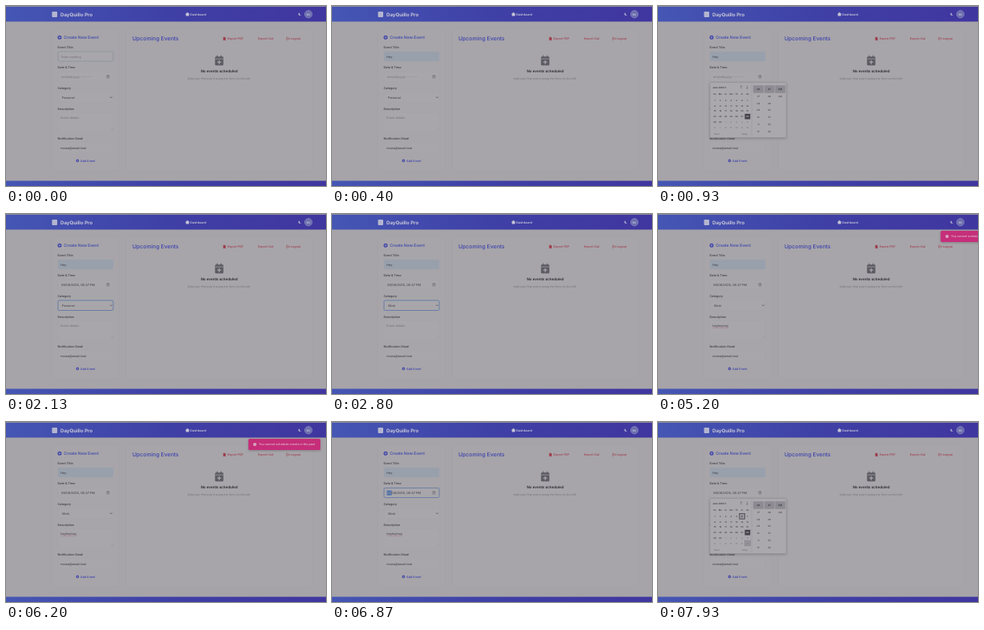
An HTML page that plays this animation: 400x225 px, repeating every 8 s.

```html
<!DOCTYPE html>
<html lang="en">
<head>
<meta charset="utf-8">
<style>
html, body { margin: 0; width: 100%; height: 100%; overflow: hidden; background: #a6a4a8; }
svg { display: block; width: 100vw; height: 100vh; }
text { font-family: Inter, "Liberation Sans", sans-serif; white-space: pre; text-rendering: geometricPrecision; }
</style>
</head>
<body>
<svg id="stage" viewBox="0 0 400 225">
  <defs>
    <linearGradient id="bar">
      <stop offset="0" stop-color="#4556b4"/>
      <stop offset=".5" stop-color="#3f40a6"/>
      <stop offset="1" stop-color="#40369f"/>
    </linearGradient>
    <filter id="shadow" x="-20%" y="-20%" width="140%" height="140%">
      <feDropShadow dx="0" dy="1" stdDeviation="1.5" flood-color="#333" flood-opacity=".3"/>
    </filter>
  </defs>
</svg>
<script>
const LOOP = 8000;
const INK = '#3a3940', MUTED = '#747278', BLUE = '#3d42ae', RED = '#a03a4e', PALE = '#c6c6d6', PAGE = '#a6a4a8';
const stage = document.getElementById('stage');

function add(parent, tag, attrs, content) {
  const node = document.createElementNS('http://www.w3.org/2000/svg', tag);
  for (const key in attrs) node.setAttribute(key, attrs[key]);
  if (content !== undefined) node.textContent = content;
  parent.appendChild(node);
  return node;
}
const group = (parent = stage) => add(parent, 'g', {});
const rect = (parent, x, y, width, height, fill, extra = {}) =>
  add(parent, 'rect', { x, y, width, height, fill, ...extra });
const path = (parent, d, stroke, width = .7, extra = {}) =>
  add(parent, 'path', { d, stroke, 'stroke-width': width, fill: 'none', ...extra });
const text = (parent, x, y, content, size = 3.8, fill = INK, weight = 400, anchor = 'start') =>
  add(parent, 'text', { x, y, 'font-size': size, fill, 'font-weight': weight, 'text-anchor': anchor }, content);
const show = (node, on) => node.setAttribute('visibility', on ? 'visible' : 'hidden');

function plusBadge(x, y, r) {
  add(stage, 'circle', { cx: x, cy: y, r, fill: BLUE });
  path(stage, `M${x - r * .55} ${y}h${r * 1.1}M${x} ${y - r * .55}v${r * 1.1}`, PAGE, r * .3);
}

function drawPage() {
  rect(stage, 0, 0, 400, 225, PAGE);
  rect(stage, 0, 0, 400, 19.5, 'url(#bar)');
  rect(stage, 0, 0, 400, 1, '#8d8b9b');
  rect(stage, 0, 218.5, 400, 6.5, 'url(#bar)');

  rect(stage, 57.5, 7, 6.5, 7, '#b4b5cf', { rx: 1 });
  text(stage, 68, 12.6, 'DayQuillo Pro', 6.1, PALE, 700);
  path(stage, 'M224.4 10.2L226.8 8L229.2 10.2H228.5V12.2H225.1V10.2Z', PALE, .4, { fill: PALE });
  text(stage, 230.3, 11.8, 'Dashboard', 3.8, PALE, 600);
  path(stage, 'M367.2 8.5A1.7 1.7 0 1 0 368.6 11A1.6 1.6 0 0 1 367.2 8.5Z', 'none', 0, { fill: '#a9abcb' });
  add(stage, 'circle', { cx: 378, cy: 10.2, r: 4.7, fill: '#6a6daf', stroke: '#9192be', 'stroke-width': .6 });
  text(stage, 378, 11.5, 'NV', 3.5, PALE, 600, 'middle');

  for (const [x, width] of [[57, 84.5], [150, 233]])
    rect(stage, x, 29, width, 177, '#a7a5a9', { rx: 2, stroke: '#a19fa4', 'stroke-width': .4 });

  plusBadge(67, 39.2, 2.5);
  text(stage, 72.3, 41.2, 'Create New Event', 5.1, BLUE, 500);
  const labels = [['Event Title', 53.3], ['Date & Time', 78.4], ['Category', 104.2], ['Description', 129.8], ['Notification Email', 167.2]];
  for (const [label, y] of labels) text(stage, 64.5, y, label, 3.8, INK, 500);
  for (const [y, h] of [[57, 12], [82.5, 12], [108, 12.5], [133.5, 22.5], [171, 12]])
    rect(stage, 65, y, 69, h, '#a8a6aa', { rx: 1.5, stroke: '#a3a1a6', 'stroke-width': .4 });
  text(stage, 68.3, 178.6, 'mowa@email.test');
  path(stage, 'M131.7 154.8L133.2 153.3M132.7 154.8L133.2 154.3', MUTED, .3);
  plusBadge(89.4, 193.4, 1.8);
  text(stage, 93, 194.8, 'Add Event', 3.8, BLUE, 500);

  text(stage, 158, 43.2, 'Upcoming Events', 6.9, BLUE, 500);
  path(stage, 'M271.7 39h2l.8.8v2.9h-2.8Z', RED, .3, { fill: RED });
  text(stage, 277, 42.2, 'Export PDF', 3.7, RED, 500);
  text(stage, 315, 42.2, 'Export iCal', 3.7, RED, 500);
  path(stage, 'M352.3 39.3h-1.5v3h1.5M352 40.8h2.5m-1-1.1l1.1 1.1l-1.1 1.1', RED, .55);
  text(stage, 356, 42.2, 'Logout', 3.7, RED, 500);

  rect(stage, 261.3, 63.3, 10.4, 11, '#5c5b63', { rx: 1.2 });
  rect(stage, 261.3, 65.7, 10.4, .7, PAGE);
  path(stage, 'M264 61.7v2.5M269 61.7v2.5', '#5c5b63', 1.3);
  path(stage, 'M264 70.2h5M266.5 67.7v5', PAGE, 1.2);
  text(stage, 266.5, 82.7, 'No events scheduled', 4.55, '#28272d', 600, 'middle');
  text(stage, 266.5, 91.5, 'Add your first event using the form on the left.', 3.65, MUTED, 400, 'middle');
}

function drawPicker() {
  const picker = group();
  rect(picker, 65, 95.5, 95.3, 69, '#aaa8ac', { rx: 1, stroke: '#8c8a90', 'stroke-width': .5, filter: 'url(#shadow)' });
  text(picker, 68, 102.6, 'June 2025 ▾', 2.9, INK, 600);
  path(picker, 'M104 103.3v-3.8m-1.3 1.3l1.3-1.3l1.3 1.3M111.5 99.5v3.8m-1.3-1.3l1.3 1.3l1.3-1.3', '#55545a', .45);
  const colX = i => 71 + i * 6.8, rowY = i => 119 + i * 6.7;
  'Su Mo Tu We Th Fr Sa'.split(' ').forEach((day, i) => text(picker, colX(i), 111.2, day, 2.7, INK, 500, 'middle'));
  const chosen = rect(picker, 101.8, 114.5, 6.6, 6.7, '#94929a', { stroke: '#3c3b42', 'stroke-width': .7 });
  const hovered = rect(picker, 108.5, 148.3, 7, 6.5, '#96949a', { stroke: '#77757c', 'stroke-width': .4 });
  rect(picker, 108.5, 134.7, 6.8, 6.8, '#44434a', { rx: .5 });
  for (let i = 0; i < 42; i++) {
    const today = i === 27;
    text(picker, colX(i % 7), rowY(Math.floor(i / 7)), i < 30 ? i + 1 : i - 29, 2.7,
      today ? '#d0ced2' : i < 30 ? INK : '#77757b', 500, 'middle');
  }
  text(picker, 70, 160.5, 'Clear', 2.7, '#65636a');
  text(picker, 112, 160.5, 'Today', 2.7, '#65636a', 400, 'end');

  path(picker, 'M117.3 96v68', '#98969c', .4);
  const pad = n => String(n).padStart(2, '0');
  [125.4, 139.2, 152.8].forEach((x, col) => {
    rect(picker, x - 6.4, 99.3, 12.8, 9.4, '#8d8b92', { rx: .5 });
    for (let row = 0; row < 7; row++) {
      const label = col === 0 ? pad(6 + row) : col === 1 ? 47 + row : ['PM', 'AM'][row];
      if (label) text(picker, x, 105.1 + row * 8.75, label, 2.9, INK, row ? 400 : 700, 'middle');
    }
  });
  return { picker, chosen, hovered };
}

drawPage();
const fill = rect(stage, 65, 57, 69, 12, '#98a0ac', { rx: 1.5 });
const titleText = text(stage, 68.3, 64.5, '');
const dateSegment = rect(stage, 68.5, 85.6, 6, 6, '#4c70ae');
const dateText = text(stage, 69, 90.1, '', 3.9);
const dateFirst = text(stage, 69, 90.1, '06', 3.9, '#c4c6d4');
rect(stage, 126, 86.9, 2.9, 3.1, 'none', { stroke: '#55545a', 'stroke-width': .45 });
path(stage, 'M126 87.7h2.9', '#55545a', .45);
const categoryText = text(stage, 70, 115.6, '');
path(stage, 'M130.3 113.6l1.1 1.2l1.1-1.2', INK, .7);
const noteText = text(stage, 68.3, 141.2, '');
const squiggle = path(stage, 'M68.4 142.2H88.5', '#a8505c', .45, { 'stroke-dasharray': '.8 .4' });
const focusRing = rect(stage, 65, 0, 69, 12, 'none', { rx: 1.5, 'stroke-width': .7 });
const { picker, chosen, hovered } = drawPicker();

const toast = group();
rect(toast, 0, 21, 90, 14, '#c62f7a', { rx: 1.5, filter: 'url(#shadow)' });
add(toast, 'circle', { cx: 8, cy: 28, r: 2, fill: '#dcb9cb' });
path(toast, 'M8 26.8v1.4M8 28.8v.5', '#c62f7a', .6);
text(toast, 13, 29.4, 'You cannot schedule events in the past', 3.75, '#dcbccc', 500);

const FOCUS = [
  [0, 57, 12, '#84919c'], [270, 0, 0], [2100, 108, 12.5, '#506fa8'], [2870, 133.5, 22.5, '#687f9c'],
  [4800, 0, 0], [6500, 82.5, 12, '#5672a6'], [7130, 0, 0]
];
const within = (t, from, to) => t >= from && t < to;
const clamp = v => Math.max(0, Math.min(1, v));
const easeOut = p => 1 - (1 - p) ** 3;

function setText(node, value, placeholder) {
  node.textContent = value || placeholder;
  node.setAttribute('fill', value ? INK : MUTED);
}

function render(t) {
  setText(titleText, t >= 130 ? 'Hey' : t >= 70 ? 'H' : '', 'Team meeting');
  show(fill, t >= 130);
  setText(dateText, t >= 1500 ? '06/06/2025, 06:47 PM' : '', 'mm/dd/yyyy --:-- --');
  categoryText.textContent = t >= 2500 ? 'Work' : 'Personal';
  const typed = t < 4400 ? Math.floor(clamp((t - 3300) / 800) * 6) : 6 + Math.floor(clamp((t - 4400) / 250) * 3);
  setText(noteText, 'heyhoyhoy'.slice(0, typed), 'Event details');
  show(squiggle, t >= 4800);

  const [, y, height, color] = FOCUS.filter(item => item[0] <= t).pop();
  show(focusRing, height > 0);
  focusRing.setAttribute('y', y);
  focusRing.setAttribute('height', height);
  focusRing.setAttribute('stroke', color || 'none');
  const editingDate = within(t, 6500, 7130);
  show(dateSegment, editingDate);
  show(dateFirst, editingDate);

  const open = within(t, 670, 1870) || t >= 7130;
  picker.setAttribute('display', open ? 'inline' : 'none');
  show(chosen, t >= 1500);
  show(hovered, t >= 7930);

  const entered = easeOut(clamp((t - 5142) / 300));
  const left = clamp((t - 6250) / 250) ** 2;
  toast.setAttribute('transform', `translate(${400 - 97 * (entered - left)} 0)`);
  show(toast, within(t, 5142, 6500));
}

const start = performance.now();
function tick() {
  render((performance.now() - start) % LOOP);
  requestAnimationFrame(tick);
}
tick();
</script>
</body>
</html>
```
